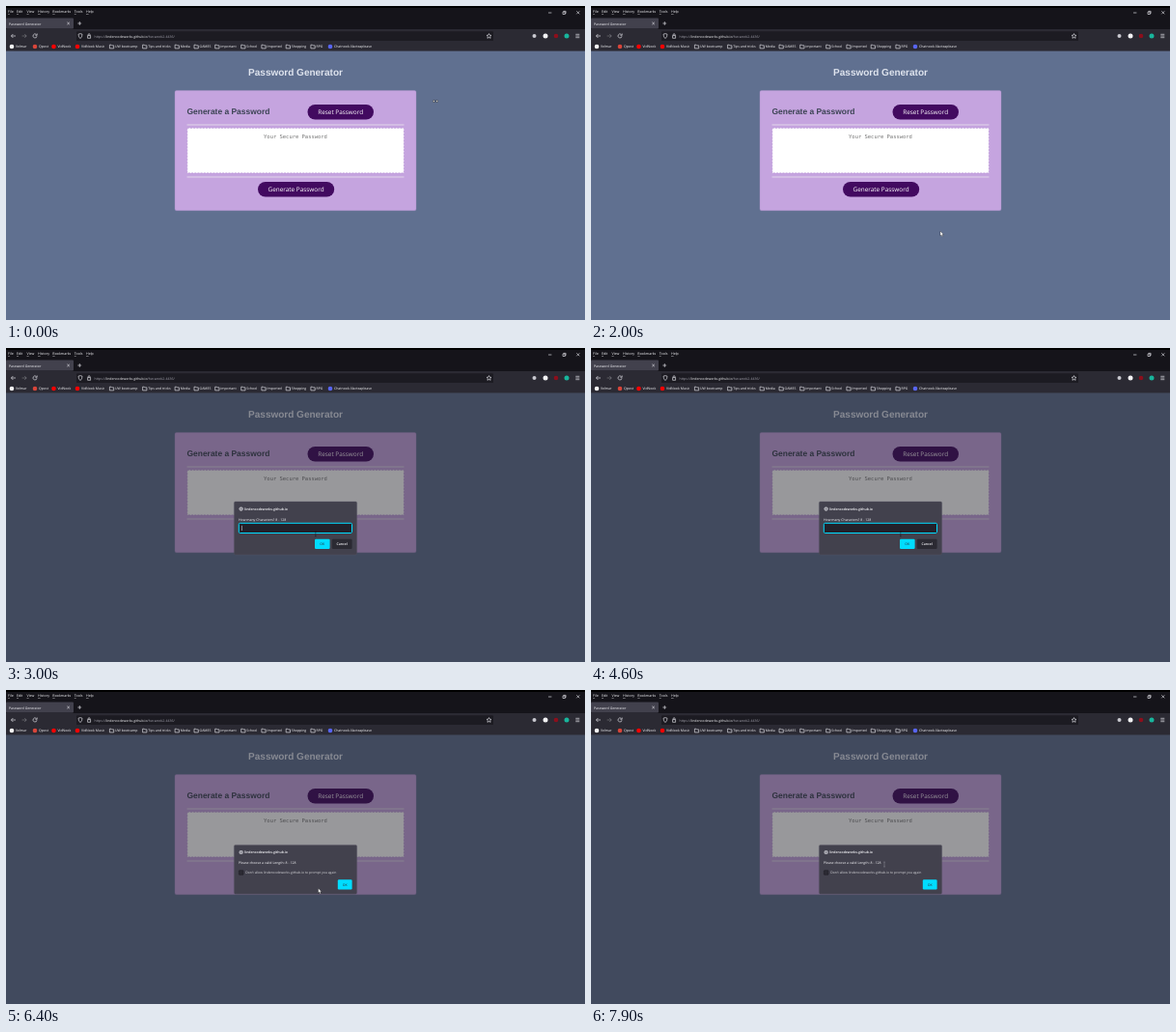
Animation of 600 by 325 pixels, one loop 8 s. Source, as an HTML page:

```html
<!DOCTYPE html>
<html lang="en">
<head>
<meta charset="utf-8">
<title>Password Generator</title>
<style>
  html, body { margin: 0; width: 100%; height: 100%; overflow: hidden; background: #607090; }
  svg { display: block; width: 100%; height: 100%; }
  text { font: 3.5px "Open Sans", "Noto Sans", sans-serif; fill: #fbfbfe; text-rendering: geometricPrecision; }
  .menu text { font-size: 3.6px; }
  .line { fill: none; stroke: #e6e6ec; stroke-width: .65; }
  .dim { fill: #a3a2ad; }
  .mid { text-anchor: middle; }
  .semi { font-weight: 600; }
  .page .title { font: bold 10px "Liberation Sans", Arial, sans-serif; fill: #dfe4ee; }
  .page .heading { font: bold 8.45px "Liberation Sans", Arial, sans-serif; fill: #3b4353; }
  .page .hint { font: 5.48px "DejaVu Sans Mono", monospace; fill: #757575; }
  .page .label { font-size: 6.4px; fill: #fff; }
  .panel { fill: #42414d; stroke: #565562; stroke-width: .4; }
  .accent { fill: #0df; }
  .onAccent { fill: #2b2a33; }
</style>
</head>
<body>
<svg viewBox="0 0 600 325">
  <defs>
    <g id="folder"><path class="line" d="M.4 .6h1.6l.7.7h2v3h-4.3z" stroke-width=".5"/></g>
    <g id="globe">
      <circle r="2.1" fill="#d8d8de"/>
      <path d="M-2 0H2M0-2V2M-1.2-1.6Q0 0-1.2 1.6M1.2-1.6Q0 0 1.2 1.6" fill="none" stroke="#555460" stroke-width=".35"/>
    </g>
  </defs>

  <g class="page">
    <rect y="46" width="600" height="279" fill="#607090"/>
    <text class="title mid" x="300" y="72">Password Generator</text>
    <rect x="175" y="87.5" width="250" height="124.2" rx="1.6" fill="#c5a4df" stroke="#a78fc4" stroke-width=".4"/>
    <text class="heading" x="187.5" y="112.2">Generate a Password</text>
    <rect x="312.5" y="102" width="68.5" height="15.6" rx="7.8" fill="#420a60"/>
    <text class="label mid" x="346.7" y="112.1">Reset Password</text>
    <path d="M187.5 123H412.5M187.5 177H412.5" stroke="#e4dbea" stroke-width=".9"/>
    <rect x="187.8" y="126.3" width="224.6" height="46.6" fill="#fff" stroke="#b893d6" stroke-width=".7" stroke-dasharray="1.9 1.3"/>
    <text class="hint mid" x="300" y="137.3">Your Secure Password</text>
    <rect x="261" y="182" width="79.2" height="15.6" rx="7.8" fill="#420a60"/>
    <text class="label mid" x="300.6" y="192.1">Generate Password</text>
  </g>

  <g class="chrome">
    <rect width="600" height="24" fill="#15141a"/>
    <rect width="600" height="2" fill="#000"/>
    <rect y="24" width="600" height="22.6" fill="#2b2a33"/>
    <g class="menu" id="menu"></g>
    <path class="line" d="M562 7h3.4M577 6.2h2.3v2.3h-2.3zM577.8 6.2v-.8h2.3v2.3h-.8M591.3 5.3l3 3m0-3l-3 3" stroke-width=".5"/>
    <rect y="12.5" width="70" height="11" rx="1" fill="#42414d"/>
    <text x="3" y="19.5">Password Generator</text>
    <path class="line" d="M63.4 16.8l2.4 2.4m0-2.4l-2.4 2.4M74.4 18h3.8M76.3 16.1v3.8"/>
    <path class="line" d="M10 31H5.4m2-2l-2 2 2 2"/>
    <path class="line" d="M16.6 31h4.6m-2-2l2 2-2 2" opacity=".4"/>
    <path class="line" d="M31.5 29.6a2 2 0 1 0 .5 1.6M32.2 28.5v1.8h-1.8"/>
    <rect x="73" y="26.3" width="432" height="9.8" rx="1.2" fill="#1c1b22"/>
    <path class="line" d="M77 28.6l2 .6q0 3-2 4.4-2-1.4-2-4.4zM84.6 30.6h3v2.7h-3zM85.2 30.6v-1a.9.9 0 0 1 1.8 0v1"/>
    <text class="dim" x="91.5" y="32.5">https://<tspan fill="#fbfbfe">lindencodeworks.github.io</tspan>/hw-week2-4436/</text>
    <path class="line" d="M500.5 28.6l.75 1.6 1.7.2-1.25 1.2.35 1.75-1.55-.9-1.55.9.35-1.75-1.25-1.2 1.7-.2z" stroke-width=".5"/>
    <circle cx="547.5" cy="31" r="2" fill="#c9c9d0"/>
    <circle cx="559" cy="31" r="2.5" fill="#f2f2f4"/>
    <circle cx="570" cy="31" r="2.3" fill="#8c0f1c"/>
    <circle cx="581" cy="31" r="2.5" fill="#18b59c"/>
    <path class="line" d="M590.3 29.3h4M590.3 31h4M590.3 32.7h4"/>
    <g id="bookmarks"></g>
  </g>

  <rect id="shade" y="46.5" width="600" height="278.5" fill="rgb(28 27 34 / .45)"/>

  <g id="prompt">
    <rect class="panel" x="236.4" y="159" width="127.2" height="55" rx="1.4"/>
    <use href="#globe" x="243.6" y="166.6"/>
    <text class="semi" x="247.2" y="168">lindencodeworks.github.io</text>
    <text x="241" y="178.8">How many Characters? 8 - 128</text>
    <rect x="241.3" y="181.3" width="117.2" height="10.2" rx="1.2" fill="#23222b" stroke="#0df" stroke-width="1"/>
    <path id="caret" d="M244.4 183.8v5.2" stroke="#fbfbfe" stroke-width=".5"/>
    <rect class="accent" x="320" y="197.8" width="15.6" height="10.2" rx="1.2"/>
    <text class="onAccent mid" x="327.8" y="204.2">OK</text>
    <rect x="337.8" y="197.8" width="20.8" height="10.2" rx="1.2" fill="#2b2a33"/>
    <text class="semi mid" x="348.2" y="204.2">Cancel</text>
  </g>

  <g id="alert">
    <rect class="panel" x="236.4" y="160.4" width="127.2" height="50.8" rx="1.4"/>
    <use href="#globe" x="243.6" y="168"/>
    <text class="semi" x="247.2" y="169.3">lindencodeworks.github.io</text>
    <text x="241" y="180.3">Please choose a valid Length: 8 - 128</text>
    <rect x="241.4" y="186.7" width="4.6" height="4.6" rx=".6" fill="#2b2a33" stroke="#1c1b22" stroke-width=".5"/>
    <text x="248.2" y="190.3" fill-opacity=".8" style="font-size:3.43px">Don't allow lindencodeworks.github.io to prompt you again</text>
    <rect class="accent" x="343.8" y="196.2" width="14.8" height="10.2" rx="1.2"/>
    <text class="onAccent mid" x="351.2" y="202.6">OK</text>
  </g>

  <g id="cursor">
    <path id="resize" d="M-3 0l2-1.4v2.8zM3 0l-2-1.4v2.8z" fill="#fff" stroke="#222" stroke-width=".5"/>
    <path id="arrow" d="M0 0v4.9l1.1-1 .8 1.8.8-.4-.8-1.7h1.5z" fill="#fff" stroke="#111" stroke-width=".3"/>
    <path id="hand" d="M-.8.6q.8-1 1.4 0v2.4l2.4.5q.8.2.7 1l-.6 3h-3.6l-1.9-2.8q.3-1.2 1.6-.2z" fill="#fff" stroke="#111" stroke-width=".4"/>
    <path id="beam" d="M-.8-2.5h1.6M0-2.5v5M-.8 2.5h1.6" fill="none" stroke-width=".4"/>
  </g>
</svg>

<script>
const LOOP = 8000, STEP = 100;
const byId = id => document.getElementById(id);
const show = (id, on) => byId(id).setAttribute('display', on ? 'inline' : 'none');

byId('menu').innerHTML = [
  ['File', 2], ['Edit', 11], ['View', 21.5], ['History', 33], ['Bookmarks', 48.3], ['Tools', 70.8], ['Help', 83]
].map(([name, x]) =>
  `<text x="${x}" y="7.3"><tspan text-decoration="underline">${name[0]}</tspan>${name.slice(1)}</text>`).join('');

// Bookmarks with a colour get a plain dot; the others get a folder.
byId('bookmarks').innerHTML = [
  ['Velmar', 10, '#f4f4f4'], ['Qpost', 34, '#d8453a'], ['VidNook', 53.5, '#f00'], ['VidNook Music', 78, '#f00'],
  ['UW bootcamp', 113], ['Tips and tricks', 147.2], ['Media', 180.7], ['GAMES', 200.6], ['important', 222.3],
  ['School', 249.3], ['Imported', 270.5], ['Shopping', 295.8], ['RPG', 321.5], ['Chatnook-lilacteaplease', 340, '#5865f2']
].map(([name, x, color]) =>
  (color ? `<circle cx="${x - 4}" cy="42" r="2.3" fill="${color}"/>` : `<use href="#folder" x="${x - 6}" y="39.6"/>`) +
  `<text x="${x}" y="43.2">${name}</text>`).join('');

// Pointer route: time, x, y
const route = [
  [0, 445, 98.5], [400, 481, 92], [600, 481, 92],
  [1700, 392, 266], [2100, 352, 222], [2500, 320, 190], [2600, 320, 188.6],
  [3000, 320.8, 192.5], [5500, 320.8, 192.5], [5900, 327, 202], [6400, 323.6, 205.2],
  [6800, 323.6, 205.2], [7500, 285, 182], [7600, 285, 182], [7900, 304, 180.5], [LOOP, 304, 180.5]
];
// Pointer shape from each time on
const shapes = [
  [0, 'resize'], [100, 'arrow'], [600, ''], [1700, 'arrow'], [2600, 'hand'],
  [3000, 'beam'], [5600, 'arrow'], [7500, 'beam']
];

function pointerAt(t) {
  const i = route.findIndex(([end]) => end > t);
  const [t0, x0, y0] = route[i - 1], [t1, x1, y1] = route[i];
  const k = (t - t0) / (t1 - t0);
  return [x0 + (x1 - x0) * k, y0 + (y1 - y0) * k];
}

function draw(now) {
  const t = Math.floor(now % LOOP / STEP) * STEP;
  const asking = t >= 3000 && t < 6000;
  show('shade', t >= 3000);
  show('prompt', asking);
  show('alert', t >= 6000);
  show('caret', asking && (t - 3000) % 1050 < 500);

  const shape = shapes.findLast(([start]) => t >= start)[1];
  for (const id of ['resize', 'arrow', 'hand', 'beam']) show(id, id === shape);
  byId('beam').setAttribute('stroke', asking ? '#111018' : '#a5a4ae');
  byId('cursor').setAttribute('transform', `translate(${pointerAt(t)})`);
}

const start = performance.now();
function tick() {
  draw(performance.now() - start);
  requestAnimationFrame(tick);
}
tick();
</script>
</body>
</html>
```
